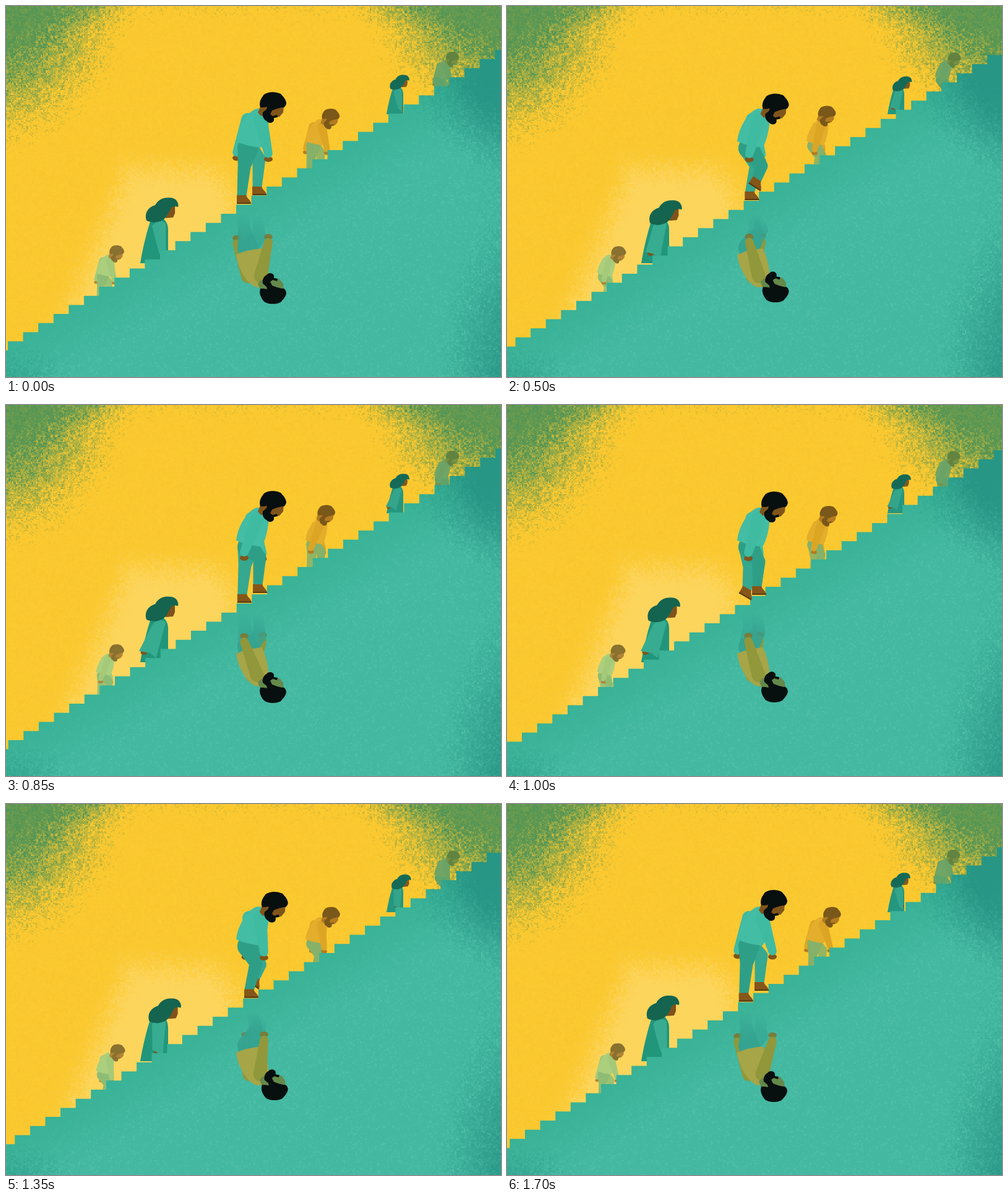
Animation of 800x600 px, one loop 1750 ms. Source, as an HTML page with a canvas:

```html
<!DOCTYPE html>
<html lang="en">
<head>
<meta charset="utf-8">
<title>Endless stairs</title>
<style>
  html, body { margin: 0; width: 100%; height: 100%; overflow: hidden; background: #fac82f; }
  canvas { display: block; }
</style>
</head>
<body>
<canvas id="stage" width="800" height="600"></canvas>
<script>
const W = 800, H = 600, LOOP = 1.75, STEP_W = 24.6, STEP_H = 14.73;
const ctx = document.getElementById('stage').getContext('2d');

// ---------- grainy textures ----------
const clamp = v => Math.max(0, Math.min(1, v));
const blend = (a, b, k) => a.map((v, i) => v + (b[i] - v) * k);
const blob = (x, y, cx, cy, rx, ry) => Math.max(0, 1 - Math.hypot((x - cx) / rx, (y - cy) / ry));

function hash(x, y) {
  let h = Math.imul(x, 374761393) + Math.imul(y, 668265263);
  h = Math.imul(h ^ (h >>> 13), 1274126177);
  return ((h ^ (h >>> 16)) >>> 0) / 4294967296;
}
const grain = (x, y) => 0.55 * hash(x >> 1, y >> 1) + 0.45 * hash(x >> 2, (y >> 2) + 999);

function texture(colorAt) {
  const canvas = document.createElement('canvas');
  canvas.width = W;
  canvas.height = H;
  const c = canvas.getContext('2d'), image = c.createImageData(W, H);
  for (let y = 0, i = 0; y < H; y++) {
    for (let x = 0; x < W; x++, i += 4) {
      image.data.set([...colorAt(x, y, grain(x, y)), 255], i);
    }
  }
  c.putImageData(image, 0, 0);
  return canvas;
}

const sky = texture((x, y, n) => {
  const inside = Math.min(x - 175 + 0.43 * (y - 235), y - 228);
  const glow = clamp(inside / 90 + 0.15) * clamp((430 - x) / 110);
  const green = 1.3 * blob(x, y, -20, -20, 240, 280) + 1.35 * blob(x, y, 815, -20, 260, 235)
    + 0.2 * clamp(1 - y / 40);
  let c = blend([248, 197, 45], [252, 203, 50], n);
  c = blend(c, [253, 216, 104], clamp((glow - n * 0.55) * 1.9) * 0.8);
  return blend(c, blend([62, 143, 91], [108, 155, 78], n), clamp((green - n * 0.5) * 1.7) * 0.93);
});

const ground = texture((x, y, n) => {
  const depth = clamp((y - 545 + 0.599 * x) / 110);
  const dark = 1.3 * blob(x, y, 815, 100, 200, 170) + 0.7 * blob(x, y, 815, 600, 150, 260)
    + 0.6 * blob(x, y, 0, 610, 150, 80) + 0.25 * clamp((x - 710) / 90);
  let c = blend([57, 178, 150], [68, 184, 161], depth);
  c = blend(c, [104, 203, 181], clamp((n - 0.6) * 2) * 0.5 * depth);
  return blend(c, [32, 140, 126], clamp((dark - n * 0.4) * 1.3) * 0.75);
});
const groundFill = ctx.createPattern(ground, 'no-repeat');

// ---------- motion ----------
// Rows are [time, ...values]; the last row closes the cycle.
function sample(rows, t) {
  t = ((t % LOOP) + LOOP) % LOOP;
  const i = rows.findIndex(r => r[0] > t), a = rows[i - 1], b = rows[i];
  const k = (t - a[0]) / (b[0] - a[0]);
  return blend(a.slice(1), b.slice(1), k);
}

// knee x, knee y, ankle x, ankle y, foot tilt, counted from the landing
const STRIDE = [
  [0, 409, 247, 406, 293, 0],
  [0.125, 407, 253, 404, 294, 0],
  [0.25, 410, 261, 399, 297, 0],
  [0.325, 412, 259, 397, 298, 0],
  [0.625, 396, 257, 389, 303, 0],
  [0.7, 392, 259, 387, 305, 0],
  [0.875, 385, 260, 381, 307, 0],
  [1, 392, 262, 388, 297, 30],
  [1.125, 404, 266, 397, 283, 46],
  [1.2, 407, 265, 400, 281, 46],
  [1.5, 414, 254, 407, 280, 24],
  [1.575, 413, 247, 406, 284, 4],
  [1.7, 411, 245, 408, 289, 0],
  [LOOP, 409, 247, 406, 293, 0]
];
const NEAR_HAND = [[0, 424], [0.25, 405], [0.45, 393], [0.7, 386], [0.85, 385], [1, 390],
  [1.2, 408], [1.5, 426], [1.62, 430], [1.7, 429], [LOOP, 424]];
const FAR_HAND = [[0, 373], [0.25, 392], [0.6, 419], [0.7, 421], [1, 408], [1.2, 398],
  [1.5, 377], [1.65, 373], [LOOP, 373]];
const SLEEVE = [[0, 255], [0.25, 240], [0.7, 226], [0.85, 223], [1, 224], [1.2, 238],
  [1.5, 251], [1.65, 256], [LOOP, 255]];

const bob = t => 0.5 - 0.5 * Math.cos(2 * Math.PI * (t + 0.04) / (LOOP / 2));
const nod = t => [3 * bob(t), 3 * bob(t)];
const sway = t => {
  const c = Math.cos(2 * Math.PI * (t - 1.52) / LOOP);
  return [-3.7 + 7.5 * c, -1.5 + 4.5 * c];
};

// ---------- figures ----------
const SHAPE = {
  torso: 'M406 166C392 168 374 196 372 219Q390 227 413 229C419 220 424 200 425 182C424 172 416 165 406 166Z',
  face: 'M407 172L412 160L449 160L448 172L442 179L430 181L420 176L412 178Z',
  hair: `M411 164C408 155 413 148 417 143C424 138 436 138 444 142C448 147 452 150 453 157
    C452 163 449 165 446 164L438 166L430 169L427 175L431 178L438 176L439 180L433 181L433 185
    C431 190 424 190 421 186C415 183 414 176 415 172L421 167L422 163L416 164Z`,
  shoe: 'M-8 -1L7 -1C9 5 15 7 15 13L-8 13Z',
  sole: 'M-8 11L15 11L15 13L-8 13Z',
  dress: 'M234 346C228 362 220 396 217 416L262 416L262 362C262 350 256 343 248 342Z',
  womanFace: 'M254 327L273 322L273 335L270 342L258 343Z',
  womanHair: `M227 347C223 335 230 325 241 322C246 313 254 309 264 310C274 309 280 318 278 325
    L273 324L268 325C264 330 262 338 257 343C250 350 237 352 227 347Z`
};
for (const key in SHAPE) SHAPE[key] = new Path2D(SHAPE[key]);

function paint(path, color) {
  ctx.fillStyle = color;
  ctx.fill(path);
}

// Tapered limb through joints [x, y, radius].
function limb(color, ...joints) {
  const path = new Path2D();
  joints.forEach(([x, y, r], i) => {
    path.moveTo(x + r, y);
    path.arc(x, y, r, 0, 2 * Math.PI);
    if (!i) return;
    const [px, py, pr] = joints[i - 1], len = Math.hypot(x - px, y - py);
    const nx = (y - py) / len, ny = (px - x) / len;
    path.moveTo(px + nx * pr, py + ny * pr);
    path.lineTo(x + nx * r, y + ny * r);
    path.lineTo(x - nx * r, y - ny * r);
    path.lineTo(px - nx * pr, py - ny * pr);
    path.closePath();
  });
  paint(path, color);
}

function oval(x, y, rx, ry, color) {
  const path = new Path2D();
  path.ellipse(x, y, rx, ry, 0, 0, 2 * Math.PI);
  paint(path, color);
}

function shifted(x, y, draw) {
  ctx.save();
  ctx.translate(x, y);
  draw();
  ctx.restore();
}

function leg(t, color, look) {
  const [kx, ky, ax, ay, tilt] = sample(STRIDE, t);
  limb(color, [391, 230, 17], [kx, ky, 10.5], [ax, ay, 7.5]);
  if (!look.shoe) return;
  shifted(ax, ay, () => {
    ctx.rotate(tilt * Math.PI / 180);
    paint(SHAPE.shoe, look.shoe);
    paint(SHAPE.sole, look.sole);
  });
}

function arm(shoulderX, handX, color, look) {
  const y = 250 - Math.abs(handX - 406) * 0.13;
  oval(handX, y, 7, 4.5, look.skin);
  limb(color, [shoulderX + (handX - 406) * 0.15, 184, 11], [handX, y - 9, 6.8]);
}

function man(t, look, head = nod) {
  arm(396, sample(FAR_HAND, t)[0], look.arm, look);
  leg(t, look.far, look);
  leg(t - LOOP / 2, look.near, look);
  paint(SHAPE.torso, look.shirt);
  arm(409, sample(NEAR_HAND, t)[0], look.arm, look);
  shifted(...head(t), () => {
    paint(SHAPE.face, look.face || look.skin);
    paint(SHAPE.hair, look.hair);
  });
}

function woman(t, look) {
  const [hand] = sample(SLEEVE, t), lift = 5 * bob(t);
  paint(SHAPE.dress, look.dress);
  oval(hand, 400, 5.5, 4, look.skin);
  const cuff = Math.min(hand * 0.5 + 131, 262);
  paint(new Path2D(`M236 356Q247 342 258 352L${cuff} 409L${cuff - 10} 401L${hand - 8} 398Z`), look.sleeve);
  shifted(lift, lift, () => {
    paint(SHAPE.womanFace, look.skin);
    paint(SHAPE.womanHair, look.hair);
  });
}

// Draws a figure scaled so that its anchor (ax, ay) lands on (x, y).
function place(x, y, scale, ax, ay, draw) {
  ctx.save();
  ctx.translate(x, y);
  ctx.scale(scale, scale);
  ctx.translate(-ax, -ay);
  draw();
  ctx.restore();
}

function fade(rgb) {
  const g = ctx.createLinearGradient(0, 222, 0, 286);
  g.addColorStop(0, `rgba(${rgb},1)`);
  g.addColorStop(0.5, `rgba(${rgb},.75)`);
  g.addColorStop(1, `rgba(${rgb},0)`);
  return g;
}

const LOOK = {
  walker: { shirt: '#43bda4', arm: '#3fbba2', near: '#2e9f86', far: '#35a88f', skin: '#80551a',
    hair: '#080f0f', shoe: '#85561a', sole: '#58380f' },
  mirrored: { shirt: '#a6a548', arm: '#91973b', near: fade('52,163,144'), far: fade('54,168,148'),
    skin: '#777d3b', face: '#64894b', hair: '#080f0f' },
  amber: { shirt: '#e3ae2b', arm: '#dda524', near: '#86b169', far: '#94b561', skin: '#b37a20', hair: '#7a581a' },
  pale: { shirt: '#abcf7d', arm: '#a4ca79', near: '#8fbc74', far: '#9dc273', skin: '#b08435', hair: '#89712f' },
  distant: { shirt: '#70a565', arm: '#6ba266', near: '#5fa36c', far: '#68a569', skin: '#789043', hair: '#628340' },
  woman: { dress: '#21967b', sleeve: '#38ac90', skin: '#7f521b', hair: '#14644f' },
  farWoman: { dress: '#25967f', sleeve: '#34a58b', skin: '#82581f', hair: '#156a57' }
};

function stairs(t) {
  const shift = 2 * t / LOOP;
  const path = new Path2D();
  path.moveTo(-100, H);
  for (let i = -2; i < 38; i++) {
    const x = 3 + STEP_W * (i - shift), y = 542.3 - STEP_H * (i - shift);
    path.lineTo(x, y);
    path.lineTo(x + STEP_W, y);
  }
  path.lineTo(W + 200, H);
  path.closePath();
  paint(path, groundFill);
}

function render(t) {
  ctx.drawImage(sky, 0, 0);
  place(711, 74, 0.5, 410, 139, () => man(t, LOOK.distant));
  place(615, 175, 0.6, 217, 416, () => woman(t, LOOK.farWoman));
  place(509.5, 165, 0.67, 410, 139, () => man(t, LOOK.amber, sway));
  woman(t, LOOK.woman);
  place(167, 387, 0.56, 410, 139, () => man(t, LOOK.pale));
  stairs(t);
  ctx.save();
  ctx.transform(1, 0, 0, -1, 0, 621);
  man(t, LOOK.mirrored);
  ctx.restore();
  man(t, LOOK.walker);
}

function tick() {
  const pose = Math.floor(performance.now() / 50) % 35;
  render(pose * 0.05);
  requestAnimationFrame(tick);
}
tick();
</script>
</body>
</html>
```
